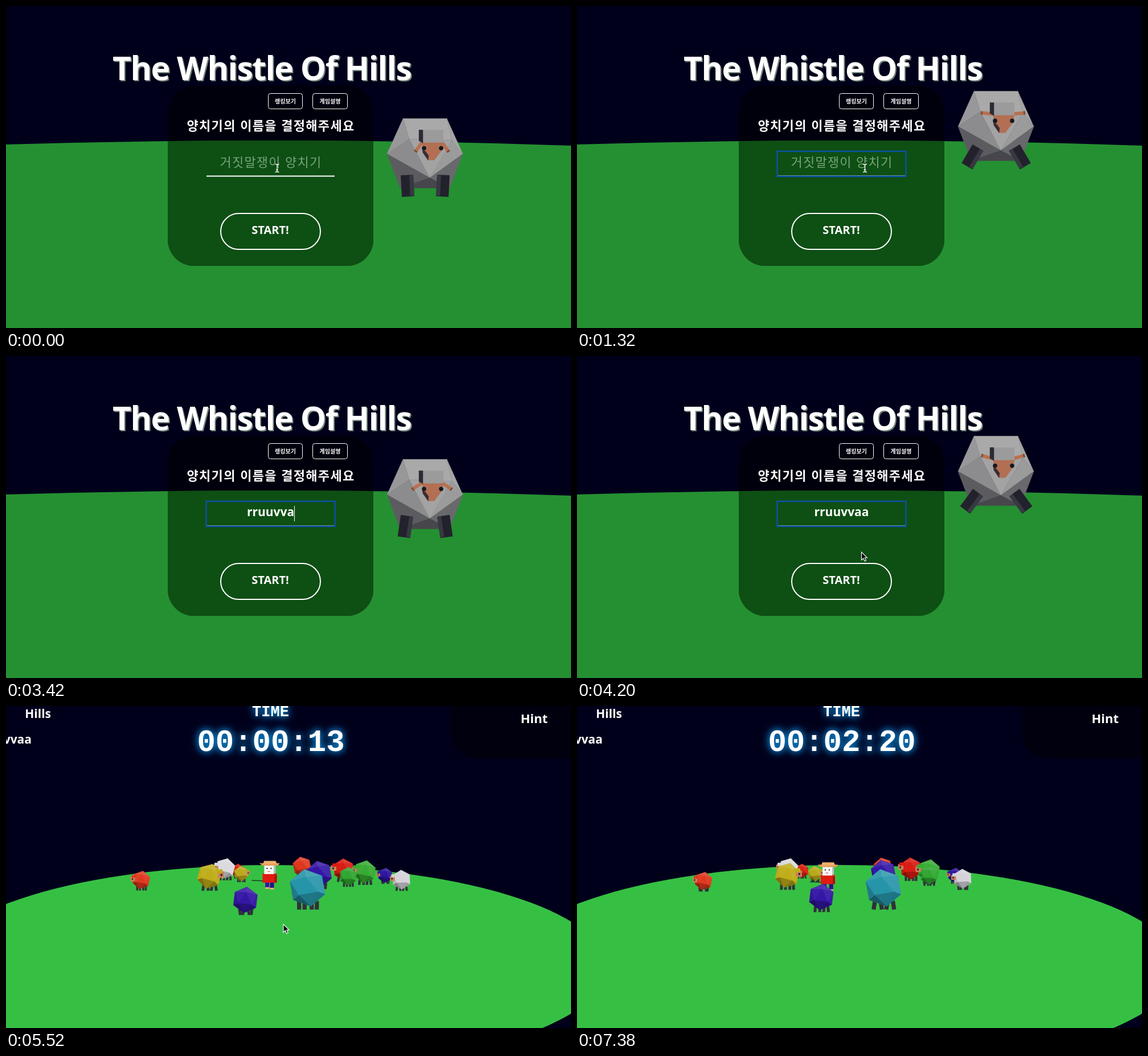
An HTML page that plays this animation: 992 by 565 pixels, repeating every 7.44 s.

```html
<!DOCTYPE html>
<html lang="ko">
<head>
<meta charset="utf-8">
<style>
html, body { margin: 0; width: 100%; height: 100%; overflow: hidden; background: #00001b; }
svg { display: block; width: 992px; height: 565px; }
text { fill: #fff; font-family: "Noto Sans", "Noto Sans CJK KR", "Noto Sans CJK", sans-serif; }
.ko { font-family: "Noto Sans CJK KR", "Noto Sans CJK", sans-serif; }
.mid { text-anchor: middle; }
.end { text-anchor: end; }
.hand { font-size: 21px; font-weight: 600; }
.title { font-size: 57px; font-weight: 700; letter-spacing: -1.5px; filter: drop-shadow(2px 2px 0 #74847a); }
.clock { font-family: "Liberation Mono", monospace; font-weight: 700;
  filter: drop-shadow(0 0 6px #0a7fc8) drop-shadow(0 0 7px #075a96); }
.outline { fill: none; stroke: #fff; }
</style>
</head>
<body>
<svg viewBox="0 0 992 565">
  <defs>
    <path id="ground" d="M0 243Q496 228 992 245V565H0Z"/>
    <clipPath id="panel"><rect x="284" y="139" width="361" height="317" rx="46"/></clipPath>
  </defs>
  <rect width="992" height="565" fill="#00001b"/>

  <g id="menu">
    <use href="#ground" fill="#259031"/>
    <text class="title" x="187" y="130">The Whistle Of Hills</text>
    <g clip-path="url(#panel)">
      <rect x="284" y="139" width="361" height="317" fill="#000" fill-opacity=".5"/>
      <use href="#ground" fill="#0e4f14"/>
    </g>
    <g id="form">
      <rect class="outline" x="460.500" y="153.500" width="60" height="27" rx="4"/>
      <rect class="outline" x="538.500" y="153.500" width="61" height="27" rx="4"/>
      <g class="mid" font-size="10" font-weight="700">
        <text class="ko" x="490.500" y="170.500">랭킹보기</text>
        <text class="ko" x="569" y="170.500">게임설명</text>
      </g>
      <text class="ko mid" x="465" y="218" font-size="22" font-weight="700" letter-spacing="1.3">양치기의 이름을 결정해주세요</text>
      <text id="hintName" class="ko mid" x="465" y="282" font-size="22" font-weight="500" letter-spacing="1.2" style="fill:#78a37b">거짓말쟁이 양치기</text>
      <text id="typed" class="mid hand" x="464.500" y="281"></text>
      <path d="M352 298.500H577" stroke="#fff" stroke-width="2"/>
      <rect id="focus" x="351.500" y="255" width="226" height="44" fill="none" stroke="#0c51a5" stroke-width="2.500"/>
      <path id="caret" d="M0 263V290" stroke="#fff"/>
      <rect class="outline" x="377" y="364" width="175" height="63" rx="31.500" stroke-width="2"/>
      <text class="mid hand" x="464" y="400" style="font-size:20px">START!</text>
    </g>
    <g id="loader"></g>
    <g id="lamb"></g>
  </g>

  <g id="game">
    <ellipse cx="464" cy="459" rx="591" ry="180" fill="#36c043"/>
    <g id="flock"></g>
    <rect x="781" y="-60" width="300" height="152" rx="45" fill="#000" fill-opacity=".45"/>
    <text class="end hand" x="79" y="21">Hills</text>
    <text class="end hand" x="45" y="66">vvaa</text>
    <text class="end hand" x="951" y="30" style="font-size:22px">Hint</text>
    <text class="clock mid" x="464.500" y="18" font-size="27">TIME</text>
    <text id="clock" class="clock mid" x="465" y="79" font-size="54"></text>
  </g>

  <path id="ibeam" d="M-3.500-7Q0-7 0-5Q0-7 3.500-7M0-5V5M-3.500 7Q0 7 0 5Q0 7 3.500 7M-2 3H2" fill="none" stroke="#fff" stroke-width="1.300"/>
  <path id="arrow" d="M0 0V14L3.300 11L5.500 16L8 15L5.800 10H10Z" fill="#050510" stroke="#fff" stroke-width="1.100"/>
</svg>
<script>
const LOOP = 7440, STEP = 60, FOCUS = 540, SUBMIT = 4680, GAME = 5400;
const KEYS = [2100, 2340, 2640, 2820, 3000, 3180, 3360, 3540];
const NAME = "rruuvvaa";
const el = id => document.getElementById(id);
const show = (id, on) => el(id).setAttribute("display", on ? "inline" : "none");
const place = (id, x, y) => el(id).setAttribute("transform", `translate(${x} ${y})`);
const mix = (a, b, k) => a + (b - a) * k;

// Piecewise linear value through [time, value] points.
function follow(points, t) {
  let i = 1;
  while (i < points.length - 1 && t > points[i][0]) i++;
  const [t0, a] = points[i - 1], [t1, b] = points[i];
  return mix(a, b, Math.min(1, Math.max(0, (t - t0) / (t1 - t0))));
}
const poly = (points, fill) => `<polygon points="${points}" fill="${fill}" stroke="${fill}" stroke-width=".4"/>`;
const box = (x, y, w, h, fill, extra = "") => `<rect x="${x}" y="${y}" width="${w}" height="${h}" fill="${fill}" ${extra}/>`;

const LAMB_BODY = (() => {
  const A = "697,0", B = "774,0", C = "708,36", D = "783,38", L = "669,62", R = "802,62",
    F = "744,104", P = "692,122", Q = "779,122";
  return [[A, B, D, C, "#a9a9a9"], [A, C, L, "#98989a"], [B, R, D, "#a5a5a5"], [C, D, F, "#a3a3a3"],
    [L, C, F, "#8c8c8e"], [D, R, F, "#9b9b9c"], [L, F, P, "#5c5c60"], [R, F, Q, "#69696d"], [P, F, Q, "#47464c"]]
    .map(face => poly(face.slice(0, -1).join(" "), face.at(-1))).join("");
})();
const LAMB_HEAD = poly("731,42 768,42 764,57 752,73 741,73 733,58", "#b26f53")
  + poly("731,55 736,57 742,65 741,73 732,60", "#382c34")
  + box(731, 20, 37, 22, "#9b9b9c") + poly("725,20 732,20 732,43 725,39", "#2b2b35")
  + `<circle cx="734" cy="52" r="3.800" fill="#17171f"/><circle cx="764" cy="52" r="3.800" fill="#17171f"/>`;
const PHASE = [[0, .25], [1320, 4.7], [2460, 8.14], [3420, 11.69], [4980, 16.97], [5460, 18.57]];

function drawLamb(t) {
  const lift = -Math.cos(follow(PHASE, t));
  const leg = lift * 34 + 30, ear = lift * 60 + 4;
  const limb = (x, angle, dir) => `<g transform="translate(${x} 99) rotate(${angle}) scale(${dir} 1)">`
    + box(-11, 0, 22, 38, "#22222d") + box(-11, 0, 7, 37, "#383842") + "</g>";
  const flap = (x, angle, dir) => `<g transform="translate(${x} 40) rotate(${angle}) scale(${dir} 1)">`
    + box(0, -3, 23, 6, "#b8704f") + box(20, -3, 3, 6, "#7d4c3a") + "</g>";
  place("lamb", 0, 150 - 49 * lift);
  el("lamb").innerHTML = LAMB_BODY + limb(704, leg, -1) + limb(768, -leg, 1)
    + flap(732, ear, -1) + flap(764, -ear, 1) + LAMB_HEAD;
}

function drawLoader(t) {
  const pills = [0, 1, 2, 3, 4].map(i => {
    const grow = .5 + .5 * Math.cos((t - 4980) / 150 - i * .75);
    return { w: mix(16, 10.5, grow), h: mix(17, 37, grow), alpha: mix(.95, .42, grow ** 4) };
  });
  let x = 464.5 - pills.reduce((sum, p) => sum + p.w, 0) / 2;
  el("loader").innerHTML = pills.map(p => {
    const shape = box(x, 282.5 - p.h / 2, p.w, p.h, "#36a9d4", `rx="${p.w / 2}" opacity="${p.alpha}"`);
    x += p.w;
    return shape;
  }).join("");
}

// Faceted ball: outer hexagon, inner triangle, shaded facets between.
function ball(r, fill, turn) {
  const at = (radius, k) => {
    const a = (k * 60 + turn) * Math.PI / 180;
    return [radius * Math.cos(a), radius * Math.sin(a)].map(v => v.toFixed(1)).join();
  };
  const outer = k => at(r, k), inner = k => at(r * .6, k);
  let out = poly([0, 1, 2, 3, 4, 5].map(outer).join(" "), fill);
  const shade = (points, y) => {
    const dark = y > 0;
    out += `<polygon points="${points.join(" ")}" fill="${dark ? "#000" : "#fff"}" opacity="${Math.abs(y) * (dark ? .4 : .16)}"/>`;
  };
  const tilt = k => Math.sin((k * 60 + turn) * Math.PI / 180 - .3);
  for (let k = 0; k < 6; k += 2) {
    shade([outer(k), outer(k + 1), inner(k)], tilt(k + .5));
    shade([outer(k), outer(k + 5), inner(k)], tilt(k - .5));
    shade([inner(k), inner(k + 2), outer(k + 1)], tilt(k + 1) * .6);
  }
  return out;
}

// from x, y, to x, y, radius, colour, facing (-1 left, 0 away, 1 right)
const FLOCK = [
  [527, 282, 537, 283, 17, "#df371f", 0],
  [402, 289, 395, 289, 12, "#d8200f", 0],
  [379, 285, 371, 285, 18, "#dadade", -1],
  [590, 286, 586, 285, 19, "#d81c13", -1],
  [625, 290, 618, 289, 20, "#37ab32", -1],
  [415, 294, 418, 294, 13, "#bba91c", 1],
  [665, 297, 664, 297, 13, "#2c149c", -1],
  [545, 294, 538, 293, 23, "#3517a5", 0],
  [608, 298, 618, 297, 16, "#30a531", 0],
  [362, 298, 369, 297, 22, "#c0ad1a", 1],
  [687, 304, 677, 303, 17, "#d5d2d8", -1],
  [231, 306, 222, 307, 16, "#e0381f", -1],
  null,
  [424, 338, 429, 335, 23, "#3517a5", 0],
  [533, 319, 538, 319, 33, "#2795a9", 0],
];

function sheep([x0, y0, x1, y1, r, fill, facing], index, k, t) {
  const swing = Math.sin(t / 130 + index) * 9;
  const leg = (x, a) => `<g transform="translate(${x * r} ${r * .7}) rotate(${a})">${box(-r * .11, 0, r * .22, r * .46, "#30303a")}</g>`;
  const face = facing && `<g transform="scale(${facing} 1)">`
    + box(r * .68, -r * .38, r * .5, r * .5, "#c9805d") + box(r * .55, -r * .55, r * .5, r * .3, fill)
    + box(r * .9, -r * .18, r * .14, r * .16, "#222") + "</g>";
  return `<g transform="translate(${mix(x0, x1, k)} ${mix(y0, y1, k)})">`
    + leg(-.45, swing) + leg(.5, -swing) + leg(-.15, -swing) + leg(.22, swing)
    + ball(r, fill, 18 + index * 13 % 30) + (face || "") + "</g>";
}

function shepherd(k, t) {
  const swing = Math.sin(t / 110) * 2;
  return `<g transform="translate(${mix(453, 440, k)} ${mix(0, 1.5, k)})">`
    + `<path d="M-31 307L-5 308" stroke="#173c20" stroke-width="1.500"/>`
    + box(-7 + swing, 308, 7, 13, "#3517a5") + box(1 - swing, 308, 7, 13, "#2a1286")
    + box(-7 + swing, 319, 7, 3, "#e3b27d") + box(1 - swing, 320, 7, 3, "#e3b27d")
    + box(-12, 295, 25, 16, "#df1b12") + box(9, 298, 4, 13, "#a9120d")
    + box(-9, 279, 17, 17, "#f5f5f5") + box(8, 280, 3, 15, "#bcbcc1")
    + box(-5, 285, 2, 2, "#222") + box(2, 285, 2, 2, "#222") + box(-3, 291, 4, 1, "#c33")
    + poly("-17,277 18,277 15,281 -12,281", "#e2a05b") + poly("-9,273 11,273 13,278 -11,278", "#efb06b") + "</g>";
}

function drawGame(t) {
  const k = (t - 6300) / 1080;
  el("flock").innerHTML = FLOCK.map((s, i) => s ? sheep(s, i, k, t) : shepherd(k, t)).join("");
  const cs = Math.max(0, Math.round(((t - 6300) * 10 / 9 + 1000) / 10));
  el("clock").textContent = [cs / 6000, cs / 100 % 60, cs % 100]
    .map(v => String(Math.floor(v)).padStart(2, "0")).join(":");
}

function drawForm(t) {
  const count = KEYS.filter(key => key <= t).length;
  const typed = el("typed");
  typed.textContent = NAME.slice(0, count);
  show("hintName", !count);
  show("focus", t >= FOCUS);
  const since = t - (count ? KEYS[count - 1] : FOCUS);
  show("caret", t >= FOCUS && since % 1000 < 500);
  place("caret", count ? Math.round(464.5 + typed.getComputedTextLength() / 2) + .5 : 464.5, 0);
}

function drawPointer(t) {
  const beam = t < KEYS[0], inGame = t >= GAME;
  show("ibeam", beam);
  show("arrow", t >= 3900 && t < 6900);
  place("ibeam", follow([[300, 476], [1200, 505.5]], t), 284.5);
  place("arrow", follow(inGame ? [[5460, 493], [6240, 415]] : [[3900, 506], [4500, 493]], t),
    follow(inGame ? [[5460, 398], [6240, 203]] : [[3900, 290], [4500, 398]], t));
}

function render(t) {
  const playing = t >= GAME, loading = t >= SUBMIT;
  show("menu", !playing);
  show("game", playing);
  show("form", !loading);
  show("loader", loading);
  if (playing) drawGame(t);
  else {
    drawLamb(t);
    if (loading) drawLoader(t);
    else drawForm(t);
  }
  drawPointer(t);
}

const start = performance.now();
function tick() {
  const t = (performance.now() - start) % LOOP;
  render(Math.floor(t / STEP) * STEP);
  requestAnimationFrame(tick);
}
tick();
</script>
</body>
</html>
```
